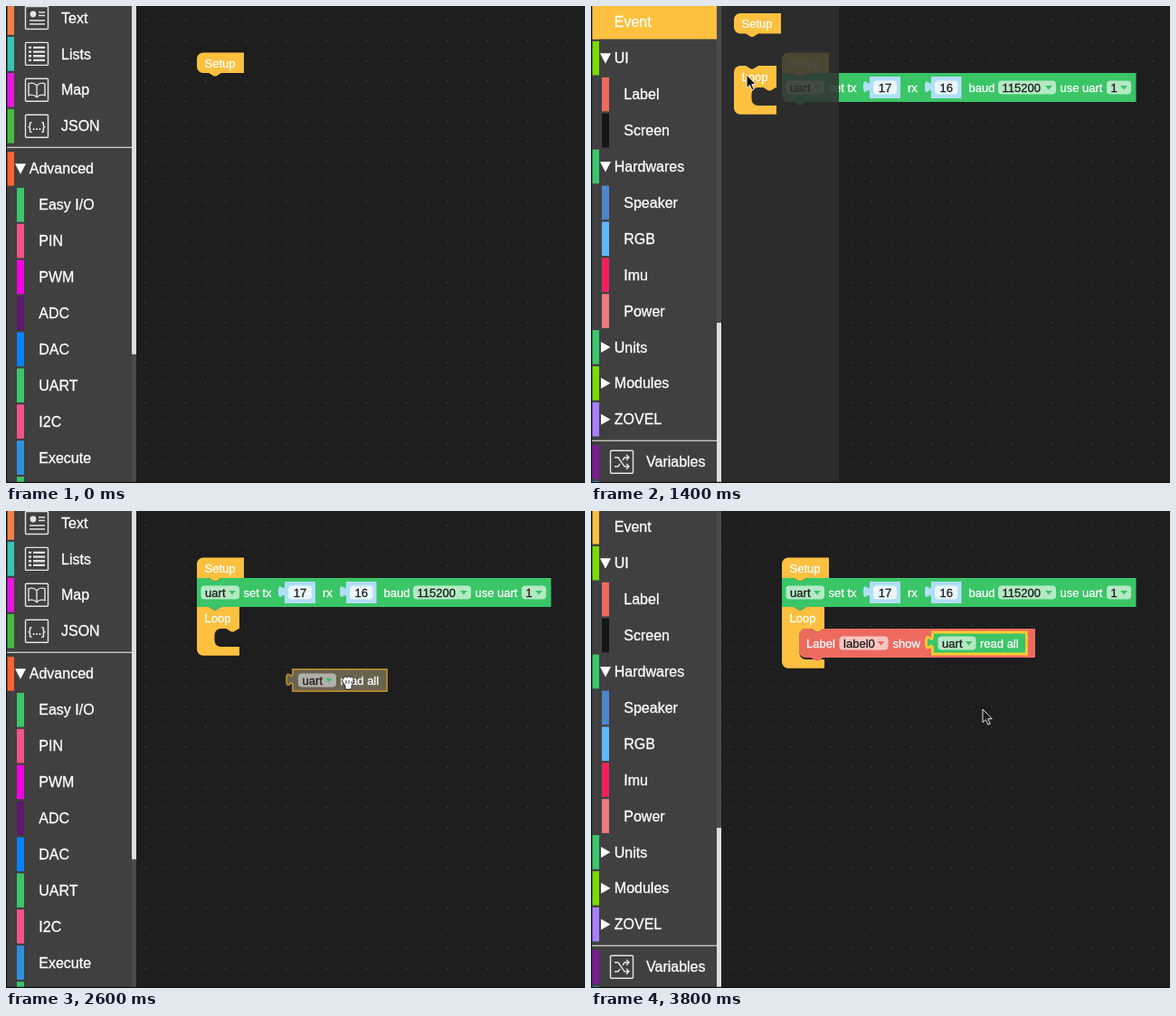
An HTML page that plays this animation: 640 by 527 pixels, repeating every 4000 ms.

```html
<!DOCTYPE html>
<html lang="en">
<head>
<meta charset="utf-8">
<title>Block editor</title>
<style>
  html, body { margin: 0; width: 100%; height: 100%; overflow: hidden; background: #1e1e1e; }
  svg { display: block; width: 100%; height: 100%; }
  text { font: 13px "Liberation Sans", Arial, sans-serif; white-space: pre; stroke-width: .3; }
  .menu { font-size: 16px; }
  .quote { font: bold 26px "Liberation Serif", serif; }
  .icon { fill: none; stroke: #e4e4e4; stroke-width: 1.4; }
  .icon .solid { fill: #e4e4e4; stroke: none; }
  .icon text { font: bold 12px "Liberation Sans", sans-serif; fill: #e4e4e4; stroke: none; text-anchor: middle; }
</style>
</head>
<body>
<svg viewBox="0 0 640 527">
  <defs>
    <pattern id="dots" x="175.5" y="15.5" width="22.24" height="22.24" patternUnits="userSpaceOnUse">
      <rect width="1.2" height="1.2" fill="#4b4b4b"/>
    </pattern>
  </defs>
  <rect width="640" height="527" fill="#1e1e1e"/>
  <rect width="640" height="527" fill="url(#dots)"/>
  <g id="scene"></g>
  <path d="M0 526.4H640M.5 0V527" stroke="#121212" stroke-width="1.2"/>
</svg>
<script>
const scene = document.getElementById('scene');
const STEP = 200, STEPS = 20, ROW = 39.9;
const GREEN = '#3ac567', YELLOW = '#fdc03f', RED = '#ed6a5f', BLUE = '#b0dff6';
const GREY = '#6a6350', GOLD = '#ab8630', PICK = '#ffc933';

const rect = (x, y, w, h, fill, r = 0) =>
  `<rect x="${x}" y="${y}" width="${w}" height="${h}" fill="${fill}" rx="${r}"/>`;
const text = (x, y, s, fill = '#fff', attrs = '') =>
  `<text x="${x}" y="${y}" fill="${fill}" stroke="${fill}" ${attrs}>${s}</text>`;
const move = (x, y, s) => `<g transform="translate(${x} ${y})">${s}</g>`;

// ---- Block outlines ----
const NOTCH = 'l5.5 3.6h2.7l5.5 -3.6', BUMP = 'l-5.5 3.6h-2.7l-5.5 -3.6';
const topEdge = (round, notch = NOTCH) => (round ? 'M0 7a7 7 0 0 1 7 -7' : 'M0 0') + 'H13.2' + notch;
const endEdge = round => round ? 'H7a7 7 0 0 1 -7 -7z' : 'H0z';

const statementPath = (w, h, { top = true, bottom = true, hat = false } = {}) =>
  `${topEdge(top, hat ? '' : NOTCH)}H${w}V${h}H26.9${BUMP}${endEdge(bottom)}`;
const valuePath = (w, h) => `M0 0H${w}V${h}H0V17.9c0 -8.9 -7 7 -7 -6.7s7 2.2 7 -6.7z`;
const loopPath = (inner, top) =>
  `${topEdge(top)}H47V24H46.2${BUMP}H26.5a7 7 0 0 0 -7 7v${inner - 14}a7 7 0 0 0 7 7H47v9.8${endEdge(true)}`;

const edges = { picked: [PICK, 2.8], loose: [GOLD, 2] };
function outline(d, fill, state) {
  const [stroke, width] = edges[state] || ['none', 0];
  return `<path d="${d}" fill="${state === 'loose' ? GREY : fill}" stroke="${stroke}" stroke-width="${width}"/>`;
}

// ---- Block contents; each item receives the block's colour, height and state ----
const label = (x, s) => ({ h }) => text(x, h / 2 + 4.6, s);
const menu = (x, w, s) => ({ color, h, state }) => {
  const mid = h / 2, ax = x + w - 12;
  return rect(x, mid - 7.5, w, 15, state === 'loose' ? '#b0afa8' : 'rgba(255,255,255,.62)', 4) +
    text(x + 4.6, mid + 4.6, s, '#1c1c1c') +
    `<path d="M${ax} ${mid - 2}h8l-4 4.6z" fill="${color}"/>`;
};
const plug = (x, w, s) => ({ h, state }) => move(x, h / 2 - 12,
  outline(valuePath(w, 24), BLUE, state === 'picked' ? state : '') +
  rect(4, 4.5, w - 8, 15, '#eaf6fc', 4) +
  text(w / 2, 16.6, s, '#1c1c1c', 'text-anchor="middle"'));
const swatch = x => ({ h }) => rect(x, h / 2 - 7.5, 19, 15, '#f00', 4);
const quoted = (x, s) => ({ h }) => move(x, h / 2 - 12,
  outline(valuePath(110, 24), '#f3a79b') +
  text(9, 24, '“', '#fbe1dc', 'class="quote"') + text(88, 24, '”', '#fbe1dc', 'class="quote"') +
  rect(25, 4.5, 58, 15, '#fbe1dc', 4) + text(29, 16.6, s, '#1c1c1c'));
const socket = (x, inner) => ({ h }) => move(x, h / 2 - 12, inner);

const draw = (d, color, h, items, state) =>
  outline(d, color, state) + items.map(item => item({ color, h, state })).join('');

const setupBlock = alone => draw(statementPath(52, 22.5, { hat: true, bottom: alone }), YELLOW, 23, [label(8.5, 'Setup')]);

const uartBlock = (state, shape) => draw(statementPath(391.5, 32, shape), GREEN, 32, [
  menu(4.5, 42.5, 'uart'), label(51.5, 'set tx'), plug(97, 34, '17'), label(139, 'rx'), plug(165, 33.5, '16'),
  label(206.5, 'baud'), menu(239, 64, '115200'), label(307.5, 'use uart'), menu(359, 27, '1')
], state);

const readBlock = state => draw(valuePath(104, 24), GREEN, 24, [menu(6, 42, 'uart'), label(52.5, 'read all')], state);

const showBlock = (value, w, state, shape) => draw(statementPath(w, 32, shape), RED, 32,
  [label(8, 'Label'), menu(44.5, 54, 'label0'), label(103.5, 'show'), value], state);

const loopBlock = (inner, top, state) => draw(loopPath(inner, top), YELLOW, 24, [label(8.5, 'Loop')], state);

const greeting = quoted(147.5, 'Hello J9');

// ---- Flyouts ----
const setter = (y, w, h, ...items) => move(158, y,
  draw(statementPath(w, h), RED, h, [label(8.5, 'Set'), menu(33, 53.5, 'label0'), ...items]));

const flyouts = {
  Label: [348, () => move(158, 8, showBlock(greeting, 266, 'picked')) +
    setter(66, 204, 32, label(92, 'x'), plug(112, 28, '0'), label(147.5, 'y'), plug(169, 28, '0')) +
    setter(124, 148, 32, label(92, 'x'), plug(112, 28, '0')) +
    setter(181, 148, 32, label(92, 'y'), plug(112, 28, '0')) +
    setter(238.5, 148, 24, label(92, 'color'), swatch(124)) +
    setter(287, 317.5, 32, label(92, 'color by R'), plug(163, 28, '0'), label(199.5, 'G'),
      plug(223, 28, '0'), label(259, 'B'), plug(281, 28, '0')) +
    setter(344, 230, 24, label(92, 'from'), menu(122, 103, 'FONT_Default')) +
    setter(392, 146, 24, menu(96, 45, 'hide')) +
    setter(440.5, 175, 32, label(92, 'rotate'), plug(138, 28, '0'))],
  UART: [424, () => move(158, 8, uartBlock('')) + move(165, 66, readBlock(''))],
  Event: [130, () => move(158, 8, setupBlock(true)) + move(158, 66, loopBlock(20, true, ''))]
};

// ---- Sidebar: [name, colour, kind], kind is open, shut, sub, plain or an icon drawing ----
const solid = d => `<path class="solid" d="${d}"/>`;
const line = d => `<path d="${d}"/>`;
const sections = [
  [['Event', YELLOW, 'plain'], ['UI', '#7bdb06', 'open'], ['Label', RED, 'sub'], ['Screen', '#161616', 'sub'],
   ['Hardwares', '#3cc56d', 'open'], ['Speaker', '#4d86c9', 'sub'], ['RGB', '#5fb8ff', 'sub'],
   ['Imu', '#f0225d', 'sub'], ['Power', '#f07a7d', 'sub'], ['Units', '#3cc56d', 'shut'],
   ['Modules', '#7bdb06', 'shut'], ['ZOVEL', '#a880ff', 'shut']],
  [['Variables', '#7c1a92', line('M-8 -5h4l7 10h5M-8 5h4l2 -3M1 -2l2 -3h5M5 -8l3 3l-3 3M5 2l3 3l-3 3')],
   ['Math', '#35a5e2', line('M-8 -5h6M-5 -8v6M2 -6.5h6M2 -3.5h6M-7 3l4 4m0 -4l-4 4M2 5h6M5 1.5v1.6M5 7v1.6')],
   ['Loops', '#66c7b8', '<path stroke-width="3" d="M-7 -1a7 7 0 0 1 12 -3M7 1a7 7 0 0 1 -12 3"/>' + solid('M8 -8v7h-7zM-8 8v-7h7z')],
   ['Logic', '#2356a8', line('M-2 0l5 -5M-2 0l5 5M-4 0h3') + '<circle cx="-6" r="2.6"/><circle cx="5" cy="-6" r="2"/><circle cx="5" cy="6" r="2"/>'],
   ['Graphic', YELLOW, line('M-9 3h3l4 -6l5 7l4 -8h2') + solid('M-8 1h4v4h-4zM-4 -5h4v4h-4zM1 2h4v4h-4zM5 -6h4v4h-4z')],
   ['Emoji', '#f07282', '<path stroke-width="2" stroke-dasharray="2 1.5" d="M0 8L-8 0V-5L-5 -8H-2L0 -5L2 -8H5L8 -5V0Z"/>'],
   ['Timer', '#f3225f', '<circle r="8" cy="1"/>' + line('M0 -4v5l4 2M-3 -9h6M6 -7l2 2')],
   ['Functions', '#9a57a6', line('M7 -5v-3h-13l7 8l-7 8h13v-3')],
   ['Text', '#f2804b', '<circle class="solid" cx="-4" cy="-4" r="3.4"/>' + line('M2 -6h7M2 -2.5h7M-8 3h17M-8 7h17')],
   ['Lists', '#39c3b7', '<path stroke-width="2.4" d="M-9 -7h3M-4 -7h13M-9 -2.3h3M-4 -2.3h13M-9 2.4h3M-4 2.4h13M-9 7h3M-4 7h13"/>'],
   ['Map', '#e816e0', line('M0 -5q-4 -4 -9 -2v13q5 -2 9 2q4 -4 9 -2v-13q-5 -2 -9 2v13')],
   ['JSON', '#46ba45', '<text y="4">{...}</text>']],
  [['Advanced', '#ff6331', 'open'], ['Easy I/O', '#3cc56d', 'sub'], ['PIN', '#ef5585', 'sub'],
   ['PWM', '#f000e1', 'sub'], ['ADC', '#5b1a69', 'sub'], ['DAC', '#0a82ff', 'sub'], ['UART', '#3cc56d', 'sub'],
   ['I2C', '#ef5585', 'sub'], ['Execute', '#2f92df', 'sub'], ['', '#3cc56d', 'sub']]
];
const arrows = { open: 'M10 -5.5h12l-6 11.5z', shut: 'M11 -6v12l10.5 -6z' };

function category([name, color, kind], hover, open) {
  const sub = kind === 'sub', icon = !sub && kind !== 'plain' && !arrows[kind];
  const left = sub ? 12 : 1.6, right = sub ? 20 : 9;
  if (open === 'Label' && name === 'Screen') color = '#009a08';
  if (open === 'Label' && (name === 'Imu' || name === 'Power')) color = RED;
  let out = rect(left, -18.8, right - left, 37.6, color);
  if (name === hover) out += rect(right, -18.8, 139 - right, 37.6, '#e2e2e2');
  if (name === open) out += rect(left, -18.8, 139 - left, 37.6, color);
  if (arrows[kind]) out += `<path d="${arrows[kind]}" fill="#fff"/>`;
  if (icon) out += `<g class="icon" transform="translate(34 0)"><rect x="-12.5" y="-12.5" width="25" height="25" rx="1"/>${kind}</g>`;
  return out + text(sub ? 36.3 : icon ? 61 : 25.8, 5.6, name, name === hover ? '#2a2a2a' : '#fff', 'class="menu"');
}

function sidebar(scroll, hover, open) {
  let out = rect(1, 0, 138, 527, '#404040'), y = 17.8 - scroll;
  sections.forEach((rows, i) => {
    if (i) {
      out += rect(1, y - 17, 138, 1.4, '#c4c4c4');
      y += 7.2;
    }
    for (const row of rows) {
      if (y > -30 && y < 557) out += move(0, y, category(row, hover, open));
      y += ROW;
    }
  });
  return out + rect(139, 0, 5, 527, '#dedede') + rect(139, scroll * .4775 - 2, 5, 352, '#4b4b4b');
}

// ---- Pointer ----
const pointers = {
  arrow: '<path d="M0 0V14.5L3.4 11.4L5.8 17L8.2 16L5.8 10.6H10.2Z" fill="#111" stroke="#fff" stroke-width=".9"/>',
  hand: '<path d="M-5 -5q2 -4 4 -1q2 -3 4 0q3 -2 3 2v4l-2 3v4h-7v-4l-3 -4q-1 -3 1 -4z" fill="#fff" stroke="#222"/>' +
    '<path d="M-2 -3v4M1 -3v4M4 -2v3" stroke="#222" stroke-width=".9"/>'
};

// ---- Story, one entry per step ----
const steps = [
  { scroll: 810 },
  { scroll: 810, at: [62, 414], hover: 'UART' },
  { scroll: 810, at: [172, 28], open: 'UART' },
  { scroll: 810, at: [232, 104], hand: 1, dragUart: [225, 88] },
  { scroll: 810, at: [222, 96], uart: 'picked' },
  { scroll: 810, at: [142, 265], uart: 'picked' },
  { scroll: 330, at: [103, 236], uart: 'picked' },
  { scroll: 0, at: [172, 76], uart: '', open: 'Event' },
  { scroll: 0, at: [249, 135], hand: 1, uart: '', dragLoop: [212.6, 119.2] },
  { scroll: 0, at: [246, 122], uart: '', loop: 'picked' },
  { scroll: 300, at: [100, 246], uart: '', loop: 'picked' },
  { scroll: 728, at: [95.5, 246], hover: 'JSON', uart: '', loop: 'picked' },
  { scroll: 810, at: [240, 76], open: 'UART', uart: '', loop: '' },
  { scroll: 810, at: [378, 190], hand: 1, uart: '', loop: '', read: [317, 175] },
  { scroll: 494, at: [101, 202], hover: 'Emoji', uart: '', loop: '', read: [317, 175] },
  { scroll: 0, at: [82, 92], hover: 'Label', uart: '', loop: '', read: [317, 175] },
  { scroll: 0, at: [172, 28], open: 'Label', uart: '', loop: '', read: [317, 175] },
  { scroll: 0, at: [247, 148], uart: '', loop: '', show: 'picked', read: [317, 175] },
  { scroll: 0, at: [446, 152], hand: 1, uart: '', loop: '', show: '', read: [385, 140] },
  { scroll: 0, at: [433, 219], uart: '', loop: '', show: 'done' }
];

function workspace(s) {
  const hasUart = s.uart !== undefined, hasLoop = s.loop !== undefined, hasShow = s.show !== undefined;
  let out = move(211, 51.5, setupBlock(!hasUart));
  if (hasUart) out += move(211, 74, uartBlock(s.uart, { top: false, bottom: !hasLoop }));
  if (hasLoop) out += move(211, 106, loopBlock(hasShow ? 34 : 20, false, s.loop));
  if (hasShow) {
    const done = s.show === 'done';
    out += move(230, 130, showBlock(done ? socket(147.5, readBlock('picked')) : greeting,
      done ? 261 : 266, done ? '' : s.show, { bottom: true }));
  }
  if (s.dragUart) out += move(...s.dragUart, uartBlock('loose'));
  if (s.dragLoop) out += '<path d="M220 106h4.2l5.5 3.6h2.7l5.5 -3.6h4.2" fill="none" stroke="#ffc933" stroke-width="3"/>' +
    move(...s.dragLoop, loopBlock(20, true, 'loose'));
  if (s.read) out += move(...s.read, readBlock('loose'));
  return out;
}

function flyout(name) {
  if (!name) return '';
  const [width, blocks] = flyouts[name];
  return rect(144, 0, width, 527, 'rgba(47,47,47,.85)') + blocks();
}

let shown = -1;
function frame(now) {
  const index = Math.floor(now / STEP) % STEPS;
  if (index !== shown) {
    shown = index;
    const s = steps[index];
    scene.innerHTML = workspace(s) + flyout(s.open) + sidebar(s.scroll, s.hover, s.open) +
      (s.at ? move(...s.at, pointers[s.hand ? 'hand' : 'arrow']) : '');
  }
  requestAnimationFrame(frame);
}
frame(performance.now());
</script>
</body>
</html>
```
